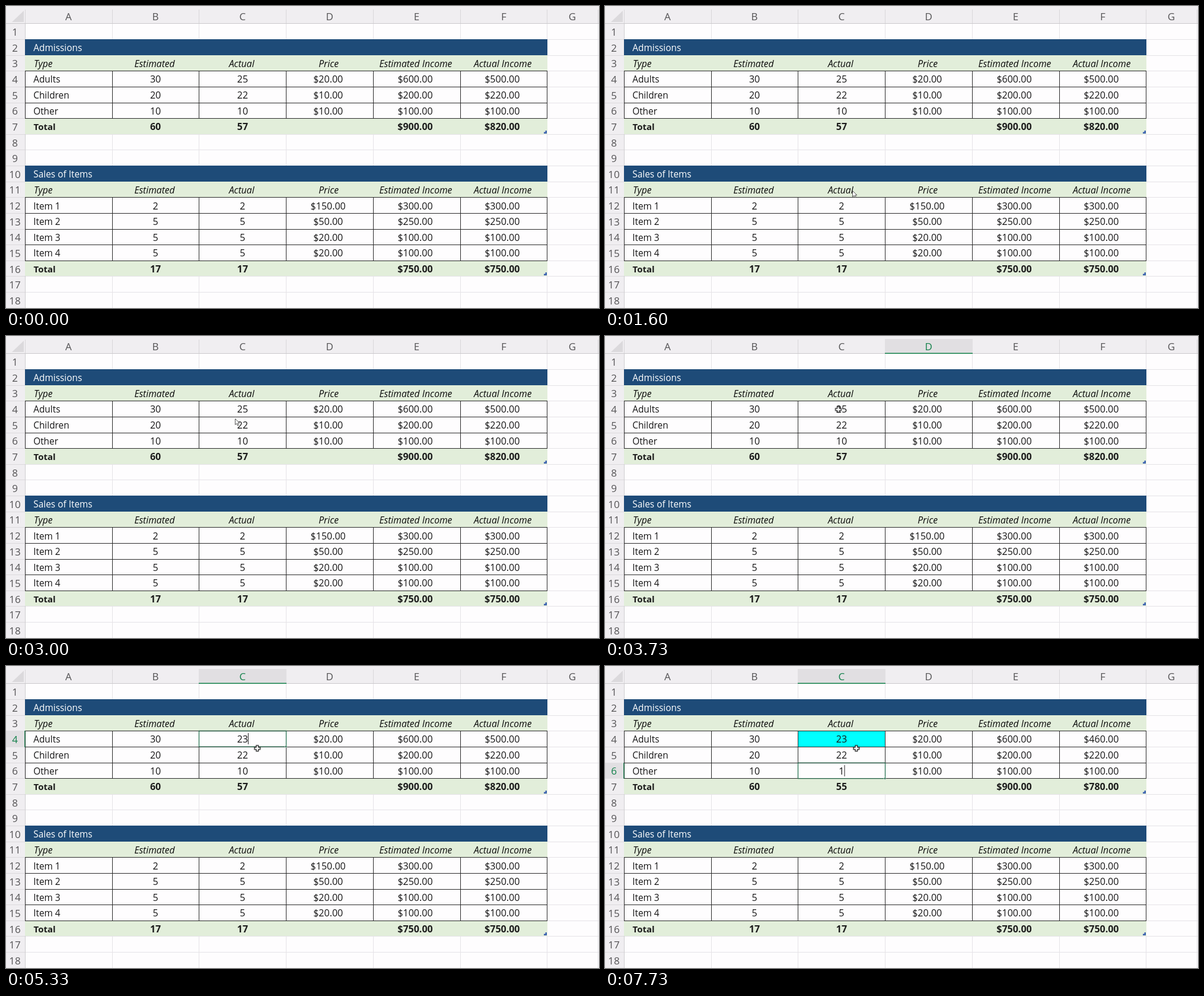
Recreate the animation shown at these times as an HTML page. Size 1000 by 509 pixels, loop 8 s.

```html
<!DOCTYPE html>
<html lang="en">
<head>
<meta charset="utf-8">
<title>Admissions budget sheet</title>
<style>
html, body { margin: 0; width: 100%; height: 100%; overflow: hidden; background: #fefdfe; }
svg { display: block; width: 100%; height: 100%; font-family: "Open Sans", "Noto Sans", sans-serif; }
text { fill: #151515; font-size: 15.4px; }
.num { font-size: 16px; }
.mid { text-anchor: middle; }
.head { font-style: italic; font-size: 15.7px; fill: #0c0c0c; }
.bold { font-weight: 700; fill: #1c1c1c; }
.bold:not(.num) { font-size: 15px; }
.title { fill: #fff; }
.label { font-size: 17px; fill: #545355; }
.green { fill: #12804a; }
.anim { animation: 8s linear infinite; }
</style>
</head>
<body>
<svg id="stage" viewBox="0 0 1000 509" preserveAspectRatio="none"></svg>
<script>
const LOOP = 8000;
const stage = document.getElementById('stage');
const sheet = document.head.appendChild(document.createElement('style'));
let serial = 0, css = '';

const colX = i => i > 6 ? 998 : Math.round(31.9 + 146.72 * i);
const rowY = r => Math.round(29.4 + 26.63 * (r - 1));
const center = i => i === 6 ? 955 : 105.3 + 146.8 * i;
const baseline = r => 49.6 + 26.63 * (r - 1);
const pct = t => (t / LOOP * 100).toFixed(3) + '%';

const box = (x, y, x2, y2, fill) =>
  `<rect x="${x}" y="${y}" width="${x2 - x}" height="${y2 - y}" fill="${fill}"/>`;
const line = (x, y, x2, y2, color, width = 1) =>
  `<path d="M${x} ${y}L${x2} ${y2}" stroke="${color}" stroke-width="${width}"/>`;
const text = (x, y, s, cls = '') => `<text x="${x}" y="${y}" class="${cls}">${s}</text>`;

function animated(frames, content) {
  const name = 'k' + serial++;
  css += `@keyframes ${name}{${frames}}`;
  return `<g class="anim" style="animation-name:${name}">${content}</g>`;
}

// Shows content only between two times.
function during(from, to, content) {
  const state = (t, v) => `${pct(t)}{visibility:${v};animation-timing-function:step-end}`;
  let frames = state(0, from ? 'hidden' : 'visible');
  if (from) frames += state(from, 'visible');
  frames += to < LOOP ? state(to, 'hidden') + state(LOOP, 'hidden') : state(LOOP, 'visible');
  return animated(frames, content);
}

// Moves content along stepped segments: [from, to, steps, x, y].
function along(x, y, segments, content) {
  const place = (t, n = 1) =>
    `${pct(t)}{transform:translate(${x}px,${y}px);animation-timing-function:steps(${n},start)}`;
  let frames = place(0);
  for (const [from, to, steps, nextX, nextY] of segments) {
    frames += place(from, steps);
    [x, y] = [nextX, nextY];
    frames += place(to);
  }
  return animated(frames + place(LOOP), content);
}

const value = (col, row, s, cls = '') =>
  text(center(col) - (s[0] === '$' ? 2.5 : 0), baseline(row), s, 'num mid ' + cls);

function changing(col, row, before, after, time, cls) {
  return during(0, time, value(col, row, before, cls)) + during(time, LOOP, value(col, row, after, cls));
}

function background() {
  let s = box(0, 0, 1000, 509, '#fefdfe') + box(0, 0, 1000, 29, '#f0eef1') + box(0, 0, 32, 509, '#f0eef1');
  for (let r = 2; r <= 18; r++) {
    const y = rowY(r) + .5;
    s += line(0, y, 32, y, '#dcdadd') + line(33, y, 1000, y, '#e5e3e7');
  }
  for (let c = 0; c < 8; c++) {
    const x = colX(c) + .5;
    s += line(x, 6, x, 29, '#d9d7da') + line(x, 30, x, 509, c ? '#e5e3e7' : '#cfcdd0');
  }
  s += line(0, 29.5, 1000, 29.5, '#cbc9cc');
  s += '<path d="M30 8V27H10Z" fill="#dbd9dc"/>';
  for (let c = 0; c < 7; c++) s += text(center(c), 24, 'ABCDEFG'[c], 'label mid');
  for (let r = 1; r <= 18; r++) s += text(15, baseline(r) + .5, r, 'label mid');
  return s;
}

function table(top, title, rows, totals) {
  const first = top + 2, last = first + rows.length;
  const left = colX(0), right = colX(6) + 1;
  const band = (row, fill) => box(left, rowY(row), right, rowY(row + 1), fill);
  let s = band(top, '#1e4b78') + band(top + 1, '#e2eeda') + band(last, '#e2eeda')
    + text(46.3, baseline(top), title, 'title')
    + text(47, baseline(top + 1), 'Type', 'head');
  ['Estimated', 'Actual', 'Price', 'Estimated Income', 'Actual Income'].forEach((name, i) =>
    s += text(center(i + 1) - 1.6, baseline(top + 1), name, 'head mid'));
  rows.forEach(([name, ...cells], i) => {
    s += text(46.2, baseline(first + i), name);
    cells.forEach((v, c) => { if (v) s += value(c + 1, first + i, v); });
  });
  s += text(46.5, baseline(last), 'Total', 'bold');
  totals.forEach((v, c) => { if (v) s += value(c + 1, last, v, 'bold'); });
  const y1 = rowY(first), y2 = rowY(last) + 1;
  for (let r = first; r <= last; r++) s += line(left, rowY(r) + .5, right, rowY(r) + .5, '#2b2b2b');
  for (let c = 0; c < 7; c++) s += line(colX(c) + .5, y1, colX(c) + .5, y2, '#2b2b2b');
  return s + `<path d="M${right - 1} ${rowY(last + 1) - 6}v5h-5v-2.5h2.5v-2.5z" fill="#3c62b0"/>`;
}

function columnMark(c) {
  const x = colX(c), x2 = colX(c + 1) + 1;
  return box(x, 5, x2, 29, '#e1dfe2') + line(x, 29.2, x2, 29.2, '#12804a', 1.5)
    + text(center(c), 24, 'ABCDEFG'[c], 'label mid green');
}

function rowMark(r) {
  const y = rowY(r), y2 = rowY(r + 1) + 1;
  return box(0, y, 32, y2, '#e1dfe2') + line(31.8, y, 31.8, y2, '#12804a', 1.2)
    + text(15, baseline(r) + .5, r, 'label mid green');
}

const selection = '<path d="M325.5 0H472.5V26.5H325.5Z" fill="none" stroke="#1d6b49" stroke-width="1.2"/>'
  + box(470.5, 24.5, 474, 28, '#fefdfe') + box(471, 25, 473.5, 27.5, '#1d6b49');

const caret = (x, row) => line(x, rowY(row) + 4, x, rowY(row) + 23, '#222');

const arrow = '<path d="M.5 .5V10.6L2.9 8.4L4.5 12L6.2 11.2L4.7 7.8H8Z" fill="#fff" stroke="#444" stroke-width=".9"/>';
const plus = '<path d="M-1.8 -4.8H1.8V-1.8H4.8V1.8H1.8V4.8H-1.8V1.8H-4.8V-1.8H-1.8Z" fill="#fff" stroke="#151515" stroke-width="1.3"/>';

const TYPE = 5070, SECOND = 5270, ENTER = 5600, DOWN = 6400, RETYPE = 7600;

stage.innerHTML = background()
  + table(2, 'Admissions', [
    ['Adults', '30', '', '$20.00', '$600.00', ''],
    ['Children', '20', '22', '$10.00', '$200.00', '$220.00'],
    ['Other', '10', '', '$10.00', '$100.00', '$100.00']
  ], ['60', '', '', '$900.00', ''])
  + table(10, 'Sales of Items', [
    ['Item 1', '2', '2', '$150.00', '$300.00', '$300.00'],
    ['Item 2', '5', '5', '$50.00', '$250.00', '$250.00'],
    ['Item 3', '5', '5', '$20.00', '$100.00', '$100.00'],
    ['Item 4', '5', '5', '$20.00', '$100.00', '$100.00']
  ], ['17', '17', '', '$750.00', '$750.00'])
  + during(ENTER, LOOP, box(colX(2) + 1, rowY(4) + 1, colX(3), rowY(5), '#00ffff'))
  + during(0, TYPE, value(2, 4, '25'))
  + during(TYPE, SECOND, value(2, 4, '2') + caret(404, 4))
  + during(SECOND, LOOP, value(2, 4, '23'))
  + during(SECOND, ENTER, caret(408.5, 4))
  + changing(2, 6, '10', '1', RETYPE)
  + during(RETYPE, LOOP, caret(404, 6))
  + changing(5, 4, '$500.00', '$460.00', ENTER)
  + changing(2, 7, '57', '55', ENTER, 'bold')
  + changing(5, 7, '$820.00', '$780.00', ENTER, 'bold')
  + during(3270, 4000, columnMark(3))
  + during(4000, LOOP, columnMark(2))
  + during(4000, ENTER, rowMark(4))
  + during(ENTER, DOWN, rowMark(5))
  + during(DOWN, LOOP, rowMark(6))
  + during(4000, LOOP, along(0, rowY(4) + .5, [
    [ENTER, 5800, 3, 0, rowY(5) + .5],
    [DOWN, 6535, 2, 0, rowY(6) + .2]
  ], selection))
  + during(0, 3270, along(404, 512, [
    [1130, 1667, 8, 417, 311],
    [1667, 1933, 4, 415, 249],
    [2000, 2195, 3, 412, 236],
    [2330, 2530, 3, 397, 197],
    [2530, 2800, 4, 384.5, 129.5],
    [2800, 3067, 4, 386, 139]
  ], arrow))
  + during(3270, LOOP, along(386, 141, [
    [3600, 3665, 1, 400.5, 135],
    [3665, 3790, 2, 393.5, 123.8],
    [4000, 4267, 4, 414, 142],
    [4267, 4467, 3, 423.8, 138.7]
  ], plus));

sheet.textContent = css;
</script>
</body>
</html>
```
